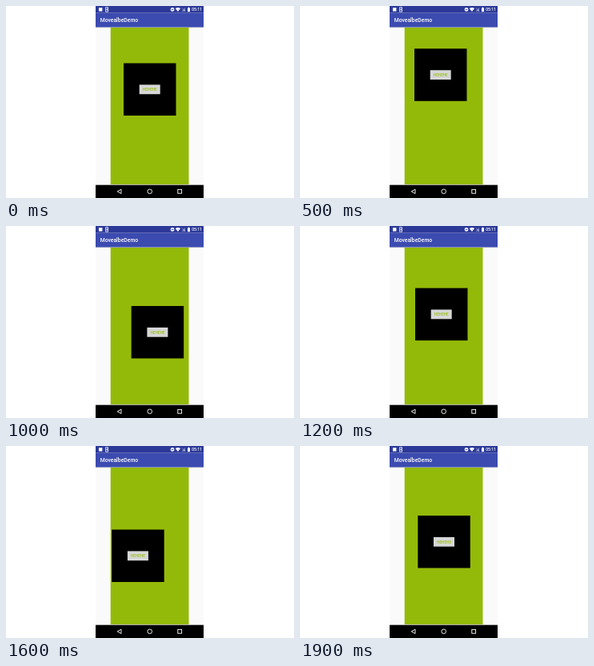
Recreate the animation shown at these times as an HTML page with a canvas. Size 360x240 px, loop 2 s.

```html
<!DOCTYPE html>
<html>
<head>
<meta charset="utf-8">
<style>
html, body { margin: 0; width: 100%; height: 100%; overflow: hidden; background: #fff; }
canvas { display: block; width: 360px; height: 240px; }
</style>
</head>
<body>
<canvas id="stage" width="360" height="240"></canvas>
<script>
const ctx = document.getElementById('stage').getContext('2d');
const LOOP = 2000, STEP = 100, SIZE = 65.5;
const GREEN = '#94ba09';

// Drag path: time, left, top
const path = [
  [0, 147, 71.5], [200, 140.3, 83.2], [500, 143, 53.3], [700, 163, 111.2],
  [900, 163, 111.2], [1200, 144, 77.6], [1600, 132.2, 104.5],
  [1900, 147.3, 87], [2000, 147, 71.5]
];

function boxAt(time) {
  let t = Math.floor(time / STEP) * STEP;
  if (t === 800) t = 700;
  const i = Math.max(1, path.findIndex(p => p[0] >= t));
  const a = path[i - 1], b = path[i];
  const k = (t - a[0]) / (b[0] - a[0]);
  return [a[1] + (b[1] - a[1]) * k, a[2] + (b[2] - a[2]) * k];
}

function rect(color, x, y, w, h) {
  ctx.fillStyle = color;
  ctx.fillRect(x, y, w, h);
}

function text(str, x, y, size, color, align = 'left', weight = 500) {
  ctx.font = `${weight} ${size}px Roboto, sans-serif`;
  ctx.textAlign = align;
  ctx.fillStyle = color;
  ctx.fillText(str, x, y);
}

function poly(points, fill) {
  ctx.beginPath();
  points.forEach(([x, y]) => ctx.lineTo(x, y));
  ctx.closePath();
  if (fill) {
    ctx.fillStyle = fill;
    ctx.fill();
  } else ctx.stroke();
}

function disc(x, y, r) {
  ctx.beginPath();
  ctx.arc(x, y, r, 0, Math.PI * 2);
}

function statusBar() {
  rect('#2c3998', 112, 0, 135, 8.5);
  rect('#fff', 116, 2.2, 4.4, 4.4);
  ctx.strokeStyle = '#fff';
  ctx.lineWidth = 0.8;
  ctx.strokeRect(124.7, 1.7, 2.8, 5.4);
  rect('#fff', 125.5, 3.3, 1.2, 2);

  disc(208, 4.4, 2.4);
  ctx.fillStyle = '#fff';
  ctx.fill();
  rect('#2c3998', 206.6, 4, 2.8, 0.8);

  poly([[211.8, 3.2], [213.2, 2.3], [215, 2], [216.8, 2.3], [218, 3.2], [215, 7]], '#fff');
  ctx.strokeStyle = '#2c3998';
  ctx.beginPath();
  ctx.moveTo(215.6, 4.6); ctx.lineTo(218, 7);
  ctx.stroke();

  poly([[224, 2], [224, 6.8], [219.4, 6.8]], '#7d87c4');
  ctx.strokeStyle = '#d4d7ec';
  ctx.lineWidth = 0.6;
  ctx.beginPath();
  ctx.moveTo(220, 2.5); ctx.lineTo(224, 6.8);
  ctx.stroke();

  rect('#fff', 227, 2.3, 3, 4.9);
  rect('#fff', 227.9, 1.6, 1.2, 1);
  text('05:11', 232.2, 6.4, 5, '#fff');
}

function navBar() {
  rect('#000', 112, 223.7, 135, 16.3);
  ctx.strokeStyle = '#fff';
  ctx.lineWidth = 0.9;
  poly([[139.2, 231.8], [144, 229.1], [144, 234.5]]);
  disc(179.7, 231.8, 2.8);
  ctx.stroke();
  ctx.strokeRect(214.8, 229.4, 4.8, 4.8);
}

function draw(time) {
  rect('#fff', 0, 0, 360, 240);
  rect('#fafafa', 112, 0, 135, 240);
  rect(GREEN, 130.7, 27, 97.8, 196);
  rect('#3b4bb0', 112, 8.5, 135, 18);
  rect('rgba(0,0,0,.15)', 112, 26.5, 135, 0.8);
  text('MovealbeDemo', 117.7, 20, 6.8, '#fff');
  statusBar();

  const [x, y] = boxAt(time);
  rect('#000', x, y, SIZE, SIZE);
  rect('#d6d7d7', x + 19.7, y + 26.9, 26, 11.8);
  text('HEHEHE', x + 32.8, y + 34.6, 4.7, '#99bf13', 'center');
  navBar();
}

const start = performance.now();
function tick() {
  draw((performance.now() - start) % LOOP);
  requestAnimationFrame(tick);
}
tick();
</script>
</body>
</html>
```
